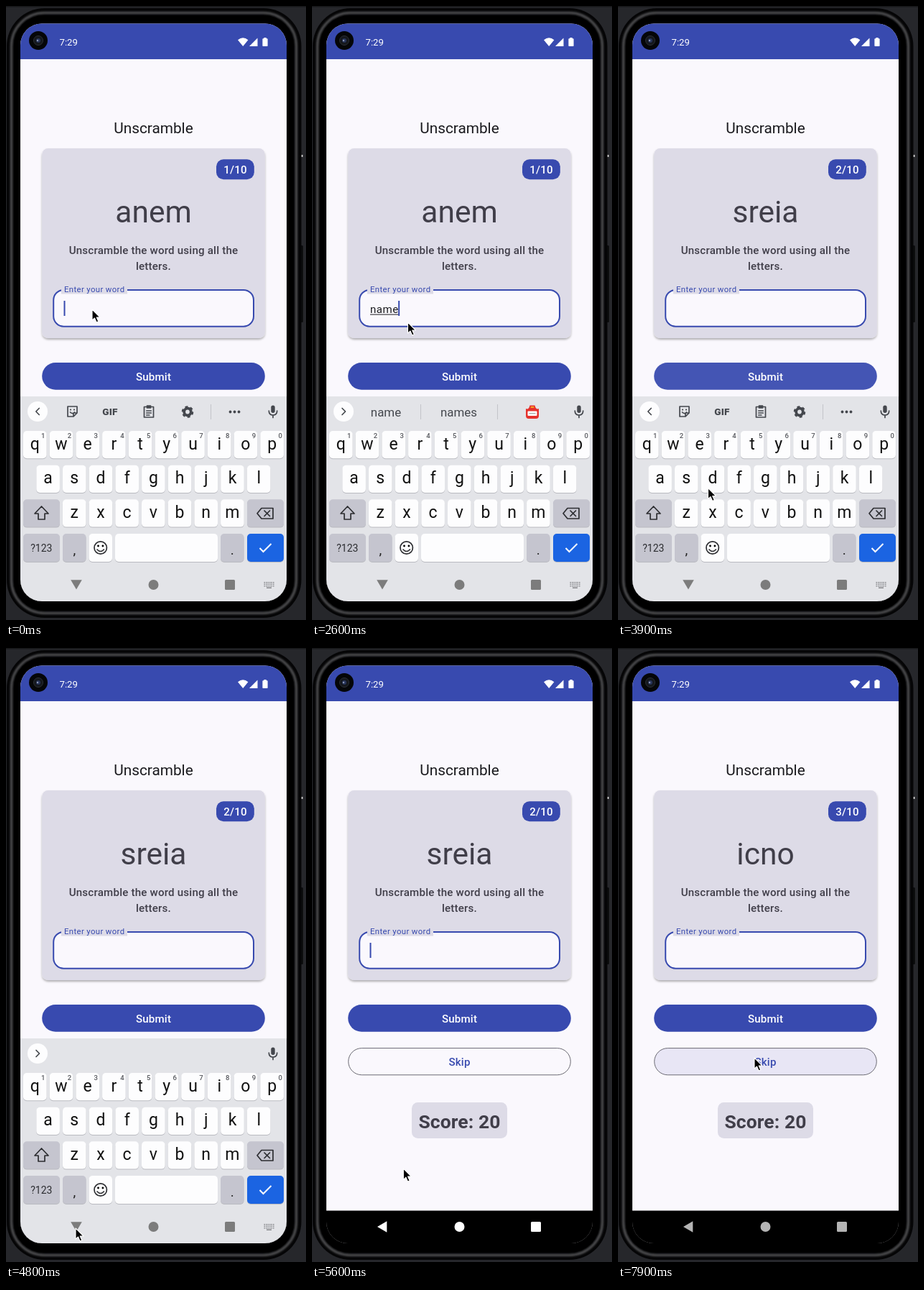
Recreate the animation shown at these times as an HTML page. Size 418 px wide and 854 px high, loop 8000 ms.

```html
<!DOCTYPE html>
<html lang="en">
<head>
<meta charset="utf-8">
<title>Unscramble</title>
<style>
  html, body { margin: 0; width: 100%; height: 100%; overflow: hidden; background: #26272b; }
  svg { display: block; width: 100%; height: 100%; }
  text { font-family: Roboto, "Noto Sans", sans-serif; white-space: pre; }
  .line { fill: none; stroke: #44474d; stroke-width: 1.7; stroke-linejoin: round; stroke-linecap: round; }
</style>
</head>
<body>
<svg id="stage" viewBox="0 0 418 854" preserveAspectRatio="none">
  <defs>
    <clipPath id="screenClip"><rect x="20" y="24.5" width="371" height="803.5" rx="30"/></clipPath>
    <clipPath id="submitClip"><rect x="50.2" y="496" width="310.6" height="37.7" rx="18.8"/></clipPath>
    <clipPath id="skipClip"><rect x="50.7" y="556.6" width="309.6" height="37.2" rx="18.6"/></clipPath>
    <filter id="soft" x="-10%" y="-10%" width="120%" height="120%">
      <feDropShadow dx="0" dy="2" stdDeviation="1.8" flood-color="#000" flood-opacity=".3"/>
    </filter>
    <filter id="blur"><feGaussianBlur stdDeviation="1.3"/></filter>
  </defs>

  <!-- phone body -->
  <rect width="418" height="854" fill="#26272b"/>
  <rect width="418" height="1.5" fill="#17181a"/>
  <rect x="410" y="333" width="4" height="107" rx="1.5" fill="#0c0d0e"/>
  <rect x="411.5" y="207" width="2" height="3" fill="#d5d5d5"/>
  <rect x="1" y="3" width="410.5" height="848" rx="53" fill="#050506"/>
  <rect x="7.5" y="9.5" width="397" height="835" rx="46" fill="none" stroke="#48494b" stroke-width="3.5" filter="url(#blur)"/>
  <rect x="11" y="13" width="390" height="828" rx="42" fill="#000"/>

  <g clip-path="url(#screenClip)">
    <rect x="20" y="24" width="371" height="804" fill="#faf8fd"/>
    <rect x="20" y="24" width="371" height="50" fill="#384aaf"/>
    <g id="app"></g>
    <rect x="20" y="782.7" width="371" height="46" fill="#000"/>
    <g id="keyboard"></g>
    <rect id="scrim" x="20" y="782.7" width="371" height="46" fill="#000"/>
    <g id="nav">
      <path id="back" d="M-7.8-6.3H7.8L0 7Z" stroke-linejoin="round"/>
      <circle cx="205.5" cy="805" r="7"/>
      <rect x="305" y="798" width="14" height="14" rx="1.5"/>
    </g>
  </g>

  <!-- camera and status icons -->
  <circle cx="45" cy="48" r="13" fill="#050608"/>
  <circle cx="45" cy="48" r="6.5" fill="#15181d" stroke="#2b2f35"/>
  <circle cx="45" cy="48" r="3" fill="#27345a"/>
  <circle cx="44" cy="48" r="1.2" fill="#8d98b3"/>
  <g fill="#fff">
    <path d="M323 47.2Q330.2 41.4 337.4 47.2L330.2 56Z"/>
    <path d="M350.5 44.5V56H339Z"/>
    <path d="M359.3 44h3.4v1.3h1.1q.8 0 .8.8v9.1q0 .8-.8.8h-5.6q-.8 0-.8-.8v-9.1q0-.8.8-.8h1.1Z"/>
  </g>

  <path id="mouse" d="M0 0V15.2L3.5 12L6.1 18L8.8 16.8L6.2 11H11Z" fill="#000" stroke="#fff" stroke-width="1.1" stroke-linejoin="round"/>
</svg>

<script>
const $ = id => document.getElementById(id);
const BLUE = '#384aaf', INK = '#403e49', CARD = '#dddbe7';

const rect = (x, y, w, h, r, fill, more = '') =>
  `<rect x="${x}" y="${y}" width="${w}" height="${h}" rx="${r}" fill="${fill}" ${more}/>`;
const text = (x, y, size, str, fill, more = '') =>
  `<text x="${x}" y="${y}" font-size="${size}" fill="${fill}" ${more}>${str}</text>`;
const MID = 'text-anchor="middle"';
const MEDIUM = MID + ' font-weight="500" letter-spacing=".2"';

function buildApp() {
  return text(74.5, 55, 13.2, '7:29', '#fff') +
    text(205.5, 177, 20.77, 'Unscramble', '#1b1b1f', MID) +
    rect(50.2, 198, 310.6, 264, 8.5, CARD, 'filter="url(#soft)"') +
    rect(293, 213.2, 52.8, 28, 10, BLUE) +
    text(319.5, 233, 15.1, '', '#fff', MEDIUM + ' id="count"') +
    text(205.5, 301, 42.5, '', INK, MID + ' id="word"') +
    text(205.5, 344.5, 15.1, 'Unscramble the word using all the', INK, MEDIUM) +
    text(205.5, 367, 15.1, 'letters.', INK, MEDIUM) +
    rect(66.2, 394.9, 278.8, 50.8, 14.1, '#faf8fd', `stroke="${BLUE}" stroke-width="2"`) +
    rect(77, 388, 92, 12.5, 0, CARD) +
    text(81, 398.3, 11.33, 'Enter your word', BLUE, 'letter-spacing=".38"') +
    text(81, 426.5, 15.1, '', '#1b1b1f', 'letter-spacing=".47" id="entry"') +
    rect(81, 428.6, 39, 1, 0, '#1b1b1f', 'id="under"') +
    rect(81, 410, 2, 21, 0, BLUE, 'id="caret"') +
    rect(50.2, 496, 310.6, 37.7, 18.8, BLUE) +
    '<g clip-path="url(#submitClip)"><circle id="submitWave" fill="#fff"/></g>' +
    text(205.5, 521, 15.1, 'Submit', '#fff', MEDIUM) +
    `<g clip-path="url(#skipClip)"><circle id="skipWave" fill="#4a45af"/></g>` +
    rect(50.7, 556.6, 309.6, 37.2, 18.6, 'none', 'stroke="#6c6b74"') +
    text(205.5, 581, 15.1, 'Skip', BLUE, MEDIUM) +
    rect(139, 632, 133, 50, 8.5, CARD) +
    text(205.5, 668, 26.5, 'Score: 20', INK, MID + ' font-weight="700" letter-spacing=".1"');
}

function buildToolbar() {
  const line = d => `<path class="line" d="${d}"/>`;
  const icons =
    line('M41.8 564l4.4-4.5M41.8 564l4.4 4.5') +
    line('M86 557h13v9l-5 5h-8ZM99 566h-5v5M89.5 565q3 3 6 0') +
    '<circle cx="90" cy="561.5" r="1.1"/><circle cx="95" cy="561.5" r="1.1"/>' +
    text(145, 569, 13.5, 'GIF', '#44474d', MID + ' font-weight="800" letter-spacing=".3"') +
    line('M192.5 557.5h13v14.5h-13ZM196.5 556h5v3h-5ZM195.8 563h6.4M195.8 566h6.4M195.8 569h4') +
    '<circle cx="253" cy="564.5" r="4.8" fill="none" stroke="#44474d" stroke-width="3.8"/>' +
    '<circle cx="253" cy="564.5" r="7.2" fill="none" stroke="#44474d" stroke-width="2.2" stroke-dasharray="4 3.54"/>' +
    rect(285, 554, 1, 21, 0, '#c3c4c9') +
    [312.5, 318.5, 324.5].map(x => `<circle cx="${x}" cy="564.5" r="1.9"/>`).join('');
  const hints =
    text(103, 570.5, 16.9, 'name', '#44474d', MID) +
    text(204.5, 570.5, 16.9, 'names', '#44474d', MID) +
    [151, 258].map(x => rect(x, 554, 1, 21, 0, '#c3c4c9')).join('') +
    '<path d="M298 560q4 2 5.5-4.5h7q1.5 6.5 5.5 4.5v10q0 4-4 4h-10q-4 0-4-4Z" fill="#e5322d"/>' +
    rect(300.5, 563.5, 13, 6.5, 1, '#fff') + rect(302.5, 566, 9, 1.3, 0, '#a8a8a8') +
    rect(304.5, 557, 5, 2, 1, '#f6a623');
  return '<circle cx="44" cy="564" r="14" fill="#fdfdfe"/>' +
    `<g id="icons" fill="#44474d">${icons}</g>` +
    `<g id="more">${line('M42 559.5l4.5 4.5l-4.5 4.5')}</g>` +
    `<g id="hints">${hints}</g>` +
    rect(369.3, 555.5, 5.4, 10.5, 2.7, '#44474d') +
    line('M366.3 563q0 6 5.7 6t5.7-6M372 569v3.5');
}

function buildKeyboard() {
  const key = (x, y, w, h, fill = '#fdfdfe') =>
    rect(x, y + 1, w, h, 5, '#b9bac0') + rect(x, y, w, h, 5, fill);
  const GREY = '#c5c5cf';
  const row = (letters, x0, y) => [...letters].map((c, i) => {
    const x = x0 + 36.7 * i;
    return key(x - 16.3, y, 32.6, 38.3) + text(x, y + 25.5, 23, c, '#111', MID);
  }).join('');
  const digits = [...'1234567890'].map((d, i) =>
    text(51.8 + 36.7 * i, 601, 9.5, d, '#55575c', MID + ' font-weight="500"')).join('');
  const line = d => `<path class="line" style="stroke:#2c2d31" d="${d}"/>`;
  let dots = '';
  for (let r = 0; r < 3; r++)
    for (let i = 0; i < 6; i++) dots += rect(359.5 + i * 2.5, 801 + r * 2.5, 1.5, 1.5, 0, '#85868a');
  return rect(20, 543, 371, 360, 0, '#e3e4e8') + buildToolbar() +
    row('qwertyuiop', 40.3, 591) + digits +
    row('asdfghjkl', 58.6, 638.7) + row('zxcvbnm', 95.2, 686.3) +
    key(24, 686.3, 51, 38.3, GREY) + line('M49.5 696l-9.5 10h5v8h9v-8h5Z') +
    key(336, 686.3, 51, 38.3, GREY) + line('M356 698.5h16v14.5h-16l-6-7.25ZM360 702l7.5 7.5M367.5 702l-7.5 7.5') +
    key(24, 734, 51, 39, GREY) + text(49.3, 759, 14, '?123', '#2c2d31', MID) +
    key(79, 734, 32.5, 39, GREY) + text(95.3, 763, 19, ',', '#222', MID) +
    key(115.5, 734, 32.5, 39) +
    '<circle class="line" style="stroke:#2c2d31" cx="131.7" cy="753.5" r="8.7"/>' +
    line('M127 756q4.7 5 9.4 0') +
    '<circle cx="128.5" cy="751" r="1.4"/><circle cx="134.9" cy="751" r="1.4"/>' +
    key(152, 734, 143, 39) +
    key(299, 734, 32.5, 39, GREY) + text(315.3, 763, 19, '.', '#222', MID) +
    key(336, 734, 51, 39, '#1b64e2') +
    '<path d="M353.5 754l5 5l11-11" fill="none" stroke="#fff" stroke-width="2"/>' +
    `<g id="kbIcon">${dots}${rect(363, 808.5, 7, 1.5, 0, '#85868a')}</g>`;
}

$('app').innerHTML = buildApp();
$('keyboard').innerHTML = buildKeyboard();

// time, x, y of the pointer tip
const path = [
  [0, 120, 422], [2300, 120, 422], [2600, 133.5, 440], [3100, 168, 512], [3600, 168, 514],
  [3900, 125.5, 670.5], [4300, 103, 771], [4500, 97, 807], [5300, 97, 807], [6100, 193, 545],
  [6600, 189.3, 527.5], [6800, 189.3, 527.5], [7100, 190, 570], [8000, 190, 570]
];
const typed = [[0, ''], [1100, 'n'], [1400, 'na'], [1800, 'nam'], [2200, 'name'], [3500, '']];
const rounds = [[0, 'anem'], [3500, 'sreia'], [7800, 'icno']];
const blinkStarts = [-200, 1100, 1400, 1800, 2200, 3300];

const ramp = (t, a, b) => Math.min(1, Math.max(0, (t - a) / (b - a)));
const smooth = u => u * u * (3 - 2 * u);
const last = (list, t) => list.filter(e => e[0] <= t).pop();
const set = (id, attrs) => { for (const k in attrs) $(id).setAttribute(k, attrs[k]); };

function pointer(t) {
  const i = path.findIndex(p => p[0] > t), a = path[i - 1], b = path[i];
  const u = smooth(ramp(t, a[0], b[0]));
  return [a[1] + (b[1] - a[1]) * u, a[2] + (b[2] - a[2]) * u];
}

function wave(id, x, y, t, start, peak, fade) {
  const u = ramp(t, start, start + 300);
  const alpha = t < start ? 0 : peak * (1 - ramp(t, fade, fade + 400));
  set(id, { cx: x, cy: y, r: 20 + 230 * u, opacity: alpha });
}

function draw(t) {
  const [mx, my] = pointer(t);
  set('mouse', { transform: `translate(${mx} ${my})` });

  const round = rounds.filter(r => r[0] <= t).length;
  $('word').textContent = rounds[round - 1][1];
  $('count').textContent = round + '/10';

  const entry = last(typed, t)[1];
  $('entry').textContent = entry;
  const width = entry ? $('entry').getComputedTextLength() : 0;
  const hinting = t >= 1900 && t < 3500;
  set('under', { width, opacity: hinting ? 1 : 0 });
  const start = blinkStarts.filter(s => s <= t).pop();
  set('caret', { x: 80.5 + width, opacity: (t - start) % 1000 < 500 ? 1 : 0 });

  wave('submitWave', 168, 515, t, 3400, .12, 3700);
  wave('skipWave', 191, 572, t, 7600, .1, 8000);

  const icons = t < 3400 ? 1 - ramp(t, 1000, 1300) : ramp(t, 3400, 3700) * (t < 4800 ? 1 : 0);
  set('icons', { opacity: icons });
  set('more', { opacity: 1 - icons });
  set('hints', { opacity: hinting ? 1 : 0 });

  // keyboard leaves, system bar turns dark
  const out = ramp(t, 4800, 5200);
  set('keyboard', {
    transform: `translate(0 ${134 * smooth(out)})`,
    opacity: out < 1 ? 1 - 1.1 * out : 0
  });
  set('kbIcon', { opacity: out ? 0 : 1 });
  set('scrim', { opacity: .62 * out });
  const dim = ramp(t, 7100, 7400);
  const tone = Math.round(124 + 131 * Math.min(1, out * 1.3) - 75 * dim);
  set('nav', { fill: `rgb(${tone},${tone},${tone})` });
  set('back', { transform: `translate(98 ${804.5 + .5 * out}) rotate(${90 * out})` });
}

function tick(now) {
  draw(Math.floor((now % 8000) / 100) * 100);
  requestAnimationFrame(tick);
}
draw(0);
requestAnimationFrame(tick);
</script>
</body>
</html>
```
